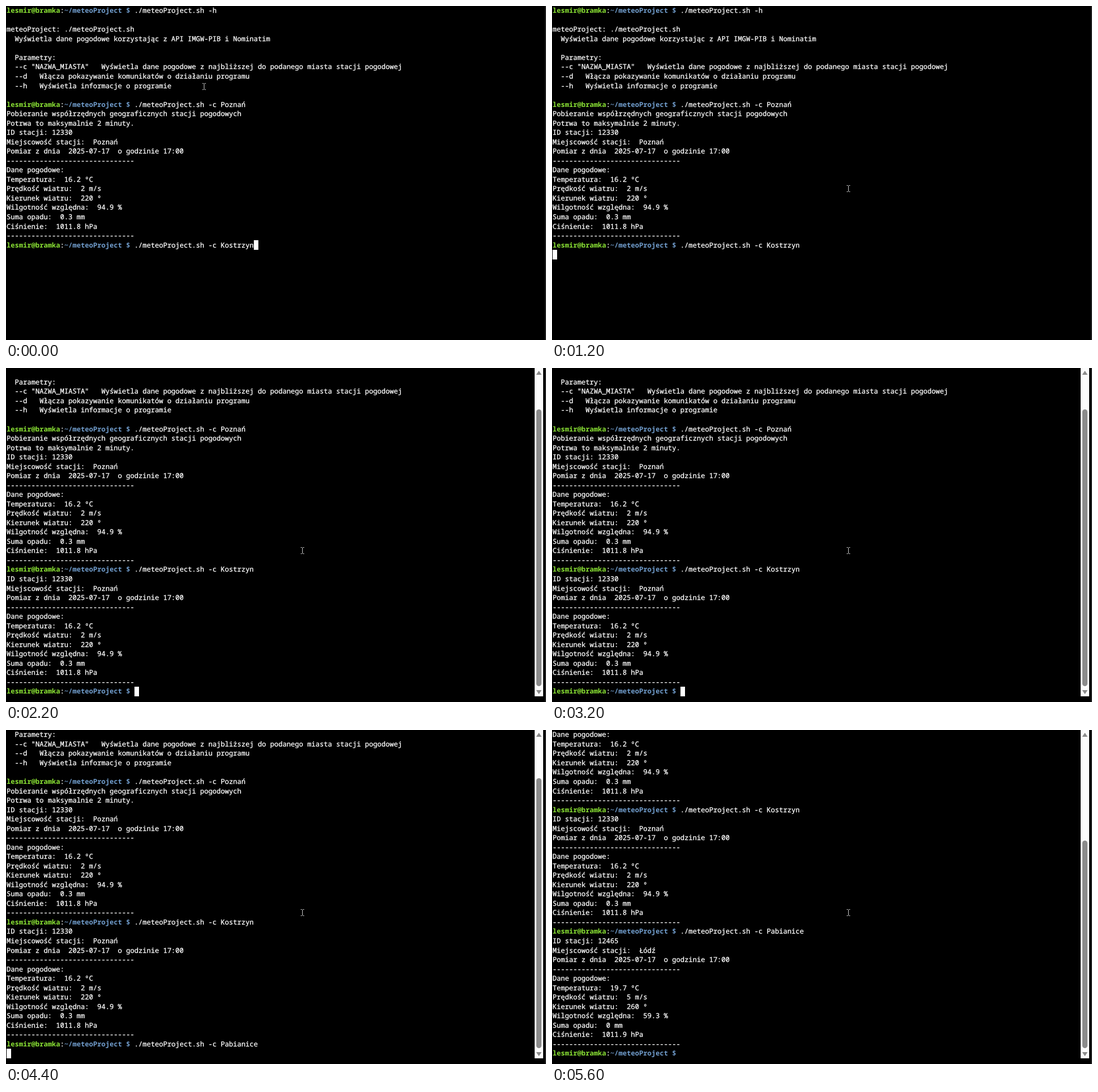
Recreate the animation shown at these times as an HTML page. Size 950x589 px, loop 7.6 s.

```html
<!DOCTYPE html>
<html lang="pl">
<head>
<meta charset="utf-8">
<title>meteoProject</title>
<style>
:root { --row: 16.53px; --loop: 7.6s step-end infinite; }
html, body { margin: 0; width: 100%; height: 100%; overflow: hidden; background: #000; }
#stage { position: relative; width: 950px; height: 589px; overflow: hidden; background: #000; }
#stage * { position: absolute; }
#log {
  left: 1px; top: 0; margin: .3px 0 0;
  font: 500 12.083px/var(--row) "Noto Sans Mono", monospace;
  font-variant-ligatures: none; text-rendering: geometricPrecision;
  -webkit-text-stroke: .3px;
  color: #fff; white-space: pre;
  animation: scroll var(--loop);
}
#log span, #log b { position: static; }
#log b { -webkit-text-stroke: 0; }
.user { color: #8ae234; }
.path { color: #729fcf; }
#out1 { animation: out1 var(--loop); }
#cmd2 { animation: cmd2 var(--loop); }
#out2 { animation: out2 var(--loop); }
#caret { width: 8px; height: 17px; background: #fff; animation: caret var(--loop); }
#mouse { left: 517px; top: 315px; animation: mouse 7.6s infinite; }
#bar { left: 930px; top: 0; width: 15px; height: 579px; background: #fcfcfc; animation: out1 var(--loop); }
#thumb { left: 3px; width: 9px; bottom: 18px; border-radius: 4.5px; background: #8b8b8b; animation: thumb var(--loop); }
#bar svg { left: 0; top: 0; }
#edge { right: 0; top: 0; width: 2px; height: 589px; background: #222; }

@keyframes scroll {
  0% { top: 0; }
  18.42% { top: calc(-4 * var(--row)); }
  57.89% { top: calc(-5 * var(--row)); }
  73.68%, 100% { top: calc(-17 * var(--row)); }
}
@keyframes out1 { 0% { visibility: hidden; } 18.42%, 100% { visibility: visible; } }
@keyframes cmd2 { 0% { visibility: hidden; } 49.99%, 100% { visibility: visible; } }
@keyframes out2 { 0% { visibility: hidden; } 73.68%, 100% { visibility: visible; } }
@keyframes caret {
  0% { left: 436px; top: 413px; }
  2.63% { left: 1px; top: 430px; }
  18.42% { left: 226px; top: 562px; }
  49.99% { left: 443px; top: 562px; }
  57.89% { left: 1px; top: 562px; visibility: visible; }
  73.68%, 100% { left: 226px; top: 562px; visibility: hidden; }
}
@keyframes mouse {
  0% { left: 344px; top: 135px; animation-timing-function: steps(6, end); }
  15.78%, 100% { left: 517px; top: 315px; }
}
@keyframes thumb {
  0% { height: 488px; }
  57.89% { height: 476px; }
  73.68%, 100% { height: 366px; }
}
</style>
</head>
<body>
<div id="stage">
  <pre id="log"></pre>
  <div id="caret"></div>
  <div id="bar">
    <div id="thumb"></div>
    <svg width="15" height="579" fill="#8b8b8b" stroke="#8b8b8b" stroke-linejoin="round">
      <path d="M3.5 11.5L7.5 5.5L11.5 11.5ZM3.5 568.5L7.5 574.5L11.5 568.5Z"/>
    </svg>
  </div>
  <svg id="mouse" width="9" height="14" fill="none" stroke="#c8c8c8">
    <path d="M1.5 1.5H3.5L4.5 2.5L5.5 1.5H7.5M4.5 2V12M1.5 12.5H3.5L4.5 11.5L5.5 12.5H7.5"/>
  </svg>
  <div id="edge"></div>
</div>
<script>
const rule = '-'.repeat(31);
const prompt = '<b class="user">lesmir@bramka</b>:<b class="path">~/meteoProject $</b> ';
const run = args => './meteoProject.sh ' + args;

const report = (id, city, temp, wind, dir, humidity, rain, pressure) => `ID stacji: ${id}
Miejscowość stacji:  ${city}
Pomiar z dnia  2025-07-17  o godzinie 17:00
${rule}
Dane pogodowe:
Temperatura:  ${temp} ºC
Prędkość wiatru:  ${wind} m/s
Kierunek wiatru:  ${dir} º
Wilgotność względna:  ${humidity} %
Suma opadu:  ${rain} mm
Ciśnienie:  ${pressure} hPa
${rule}
`;
const poznan = report(12330, 'Poznań', 16.2, 2, 220, 94.9, 0.3, 1011.8);
const lodz = report(12465, 'Łódź', 19.7, 5, 260, 59.3, 0, 1011.9);

document.getElementById('log').innerHTML = `${prompt}${run('-h')}

meteoProject: ./meteoProject.sh
  Wyświetla dane pogodowe korzystając z API IMGW-PIB i Nominatim

  Parametry:
  --c "NAZWA_MIASTA"   Wyświetla dane pogodowe z najbliższej do podanego miasta stacji pogodowej
  --d   Włącza pokazywanie komunikatów o działaniu programu
  --h   Wyświetla informacje o programie

${prompt}${run('-c Poznań')}
Pobieranie współrzędnych geograficznych stacji pogodowych
Potrwa to maksymalnie 2 minuty.
${poznan}${prompt}${run('-c Kostrzyn')}
<span id="out1">${poznan}${prompt}</span><span id="cmd2">${run('-c Pabianice')}
</span><span id="out2">${lodz}${prompt}</span>`;
</script>
</body>
</html>
```
